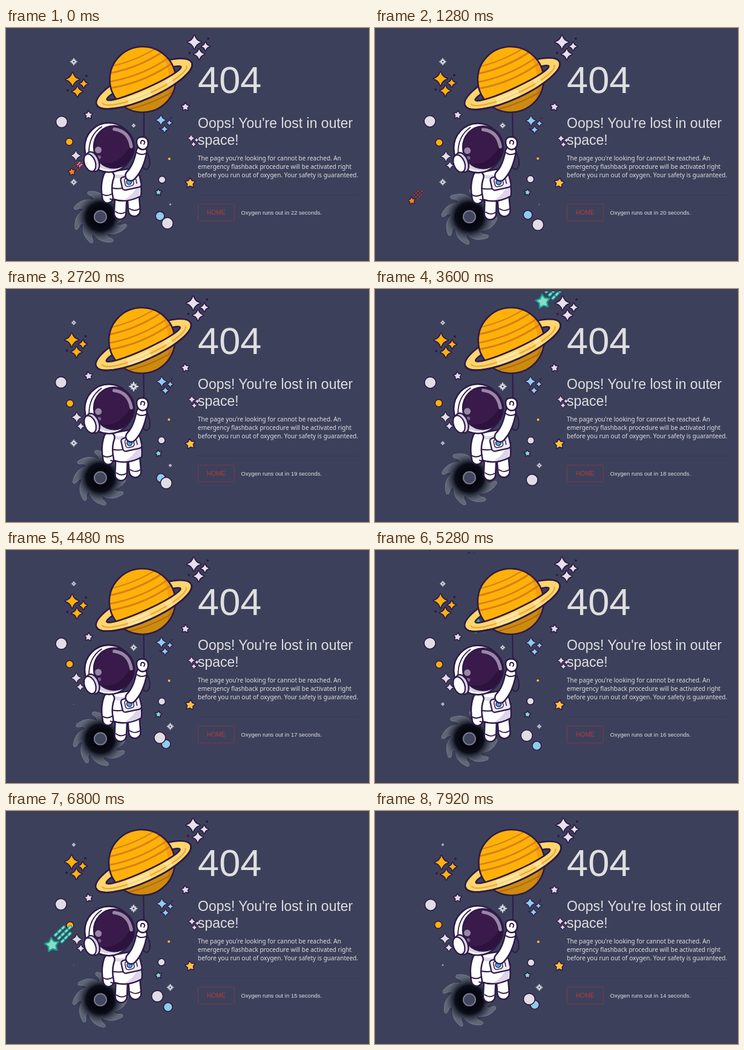
Animation, 600 px wide and 387 px high, one loop 8000 ms. Source, as an HTML page:

```html
<!DOCTYPE html>
<html lang="en">
<head>
<meta charset="utf-8">
<title>404</title>
<style>
  html, body { margin: 0; width: 100%; height: 100%; overflow: hidden; background: #3d405b; }
  svg { display: block; width: 100%; height: 100%; }
  .sans { font-family: "Liberation Sans", Arial, sans-serif; fill: #dfdfdf; }
  .note { font-family: "Noto Sans", "Open Sans", sans-serif; font-size: 10.02px; fill: #dfdfdf; }
  .ink { stroke: #2e1a47; stroke-linejoin: round; stroke-linecap: round; }
</style>
</head>
<body>
<svg viewBox="0 0 600 387" xmlns="http://www.w3.org/2000/svg">
  <defs>
    <clipPath id="art"><rect x="40" y="4" width="301" height="356"/></clipPath>
    <clipPath id="ball"><circle cx="226" cy="85.500" r="54.500"/></clipPath>
    <clipPath id="front"><rect x="-95" y="0" width="190" height="40"/></clipPath>
    <clipPath id="glass"><ellipse cx="178.500" cy="197.500" rx="33" ry="34.500"/></clipPath>
    <radialGradient id="dark">
      <stop offset="0.4" stop-color="#05060f"/>
      <stop offset="0.6" stop-color="#0a0d18"/>
      <stop offset="1" stop-color="#2b3044" stop-opacity="0"/>
    </radialGradient>
  </defs>

  <g clip-path="url(#art)">
    <g id="decor"></g>
    <g id="comets"></g>
    <g id="hole" transform="translate(156 313.500)">
      <g id="arms"></g>
      <circle r="39" fill="url(#dark)"/>
      <circle r="10" fill="#42465f" stroke="#777b8d" stroke-width="2"/>
    </g>

    <g id="planet">
      <path d="M228 138V186" class="ink" stroke-width="2"/>
      <g transform="translate(228.500 92.500) rotate(-24)">
        <path id="ring" class="ink" fill="#ffd56c" fill-rule="evenodd" stroke-width="2.6"
          d="M-86 0A86 25 0 0 1 86 0A86 25 0 0 1 -86 0ZM-67 -1A67 9 0 0 0 67 -1A67 9 0 0 0 -67 -1Z"/>
      </g>
      <circle cx="226" cy="85.500" r="54.500" fill="#ffb10a"/>
      <g clip-path="url(#ball)">
        <path d="M246 28Q284 66 262 142L290 142V28Z" fill="#f39c0c"/>
        <g id="bands" transform="translate(226 85.500) rotate(-22)" fill="none" stroke="#d87f13" stroke-linecap="round"></g>
        <rect x="-90" y="8" width="180" height="70" transform="translate(228.500 92.500) rotate(-24)" fill="#6b4214" opacity=".34"/>
      </g>
      <circle cx="226" cy="85.500" r="54.500" fill="none" class="ink" stroke-width="2.6"/>
      <g transform="translate(228.500 92.500) rotate(-24)">
        <g clip-path="url(#front)">
          <use href="#ring"/>
          <path d="M-76 1A76 17 0 0 0 76 1" fill="none" stroke="#e2aa42" stroke-width="2.2"/>
          <path d="M-36 15Q-18 18 4 17.500" fill="none" stroke="#fff0b5" stroke-width="11" opacity=".6"/>
          <path d="M34 15Q40 14 45 13" fill="none" stroke="#fff0b5" stroke-width="10" opacity=".55"/>
        </g>
        <path d="M-86 0A86 25 0 0 0 86 0" fill="none" class="ink" stroke-width="2.6"/>
      </g>
    </g>

    <g id="man">
      <path d="M228 198Q240 216 237 229Q233 239 227 232" fill="none" class="ink" stroke-width="2"/>
      <g id="legs"></g>
      <path d="M181 305Q189 311 197 306M204 300Q213 306 221 300" fill="none" class="ink" stroke-width="1.800"/>
      <path d="M166 240Q163 264 177 284Q198 292 223 279Q226 256 214 232Z" fill="#fff" class="ink" stroke-width="2.500"/>
      <path d="M176 241Q192 249 211 236L213 243Q194 254 178 248Z" fill="#ded5ea"/>
      <path d="M216 262L222 262L221 278Q208 285 194 286Q212 276 216 262Z" fill="#ded5ea"/>
      <path d="M176 266Q199 270 224 255" fill="none" class="ink" stroke-width="2"/>
      <g transform="translate(206.500 256) rotate(-12)" class="ink">
        <rect x="-16" y="-11" width="32" height="22" rx="5" fill="#eee9f5" stroke-width="2.300"/>
        <rect x="-10" y="-8" width="14" height="14" rx="4" fill="#fff" stroke-width="1.500"/>
        <circle cx="-3" cy="-1" r="4.300" fill="#4aa3e8" stroke-width="1.400"/>
        <path d="M9 -3V4" stroke-width="1.500"/>
      </g>
      <g id="upperArms"></g>
      <path d="M215 206Q223 213 232 208" fill="none" class="ink" stroke-width="2"/>
      <path d="M216 191Q215 181 225 181Q235 181 235 191Q235 202 225 202Q217 200 216 191Z" fill="#fff" class="ink" stroke-width="2.400"/>
      <path d="M223 192Q222 186 227 187Q231 189 228 193" class="ink" fill="none" stroke-width="2"/>
      <path d="M159 276Q167 281 176 275M172 284L179 286" fill="none" class="ink" stroke-width="2"/>
      <ellipse cx="170" cy="198.500" rx="40" ry="41" fill="#fff" class="ink" stroke-width="2.600"/>
      <path d="M146 225Q162 241 188 234Q166 231 153 217Z" fill="#d9cfe6"/>
      <ellipse cx="178.500" cy="197.500" rx="33.500" ry="35" fill="#3a1a4b" class="ink" stroke-width="2.500"/>
      <g clip-path="url(#glass)">
        <path d="M152 222Q184 234 207 194L218 214L190 239Z" fill="#2d123d"/>
        <path d="M179 168Q203 171 207 197" fill="none" stroke="#9688a6" stroke-width="5.500" stroke-linecap="round"/>
        <circle cx="152.500" cy="202.500" r="5.500" fill="#9688a6"/>
        <circle cx="154" cy="214.500" r="3" fill="#75638a"/>
      </g>
      <path d="M137 207Q137 178 158 164" fill="none" class="ink" stroke-width="1.800"/>
      <g transform="translate(140.500 223) rotate(-20)">
        <ellipse cx="3" rx="10" ry="17" fill="#d9cfe6" class="ink" stroke-width="2.400"/>
        <ellipse cx="-2" rx="9" ry="15" fill="#fff" class="ink" stroke-width="2.200"/>
      </g>
    </g>
  </g>

  <text class="sans" x="317" y="107.500" font-size="63.200">404</text>
  <text class="sans" font-size="23"><tspan x="317" y="166">Oops! You're lost in outer</tspan><tspan x="317" y="194">space!</tspan></text>
  <text class="note">
    <tspan x="317" y="220">The page you're looking for cannot be reached. An</tspan>
    <tspan x="317" y="234">emergency flashback procedure will be activated right</tspan>
    <tspan x="317" y="248">before you run out of oxygen. Your safety is guaranteed.</tspan>
  </text>
  <path d="M317 277.500H583" stroke="#383a54"/>
  <rect x="317.500" y="292.500" width="60" height="28" rx="2" fill="none" stroke="#763b48"/>
  <text class="sans" x="332" y="310" font-size="10.200" style="fill:#b23c36">HOME</text>
  <text class="sans" id="count" x="388.500" y="309.500" font-size="9.500"></text>
</svg>
<script>
const LOOP = 8000, TAU = Math.PI * 2;
const $ = id => document.getElementById(id);
const INK = '#2e1a47';

function add(parent, tag, attrs) {
  const el = document.createElementNS('http://www.w3.org/2000/svg', tag);
  for (const k in attrs) el.setAttribute(k, attrs[k]);
  parent.append(el);
  return el;
}
const place = (el, x, y, rot = 0, size = 1) =>
  el.setAttribute('transform', `translate(${x} ${y}) rotate(${rot}) scale(${size})`);

function spark(r) {
  const c = r * 0.22;
  return `M0 ${-r}Q${c} ${-c} ${r} 0Q${c} ${c} 0 ${r}Q${-c} ${c} ${-r} 0Q${-c} ${-c} 0 ${-r}Z`;
}
function fivePoint(r) {
  let d = '';
  for (let i = 0; i < 10; i++) {
    const a = i * TAU / 10, q = i % 2 ? r * 0.55 : r;
    d += (i ? 'L' : 'M') + (q * Math.sin(a)).toFixed(2) + ' ' + (-q * Math.cos(a)).toFixed(2);
  }
  return d + 'Z';
}
function limb(parent, d, w) {
  for (const [color, width] of [[INK, w + 5], ['#fff', w]])
    add(parent, 'path', { d, fill: 'none', stroke: color, 'stroke-width': width, 'stroke-linecap': 'round' });
}

limb($('legs'), 'M190 278L188.500 308', 17);
limb($('legs'), 'M210 276L212 303', 17);
limb($('upperArms'), 'M170 246Q164 262 168 282', 15);
limb($('upperArms'), 'M206 245Q219 232 224 205', 15);

for (const [y, w] of [[-44, 2], [-33, 3], [-19, 2.5], [-8, 3], [22, 2.5], [33, 2]])
  add($('bands'), 'path', { d: `M-60 ${y}Q0 ${y + 15} 60 ${y}`, 'stroke-width': w });

for (let i = 0; i < 8; i++)
  add($('arms'), 'path', {
    d: 'M15 -20Q6 -44 -19 -42Q-24 -39 -18 -36Q-7 -33 -12 -20Z',
    fill: '#5f6676', stroke: '#747a88', 'stroke-width': 1, transform: `rotate(${i * 45})`
  });

// Drifting items: x, y, shift x, shift y at the far end of the sway
const drifters = [];
function drifter(x, y, dx, dy) {
  const el = add($('decor'), 'g', {});
  drifters.push({ el, x, y, dx, dy });
  return el;
}
function cluster(x, y, dx, dy, fill, line, parts, dots = []) {
  const g = drifter(x, y, dx, dy);
  for (const [px, py, r] of parts)
    add(g, 'path', { d: spark(r), fill, stroke: INK, 'stroke-width': line, 'stroke-linejoin': 'round', 'paint-order': 'stroke', transform: `translate(${px} ${py})` });
  for (const [px, py, r] of dots) add(g, 'circle', { cx: px, cy: py, r, fill: INK });
}
const trio = [[0, 0, 11], [18.5, 7, 6.5], [8, 20, 8.5]], trioDots = [[-8, 18, 2], [23, -6, 2]];
cluster(110, 85.5, -2, -1.3, '#ffb10a', 3.6, trio, trioDots);
cluster(311.3, 23.5, -2.7, 0, '#e6e1ea', 3.6, trio, trioDots);
cluster(256, 153, 2, 1.2, '#8ecdf0', 2.6, [[0, 0, 8], [14, 4.5, 4.5], [6, 15, 5.5]], [[17, -4, 1.3], [-2, 14, 1.3]]);
cluster(115.5, 212, 2, 1.4, '#e2dce8', 2.6, [[0, 0, 8], [6.5, 15, 6]]);
cluster(306, 183, 1.6, 0.6, '#e6d5df', 2.2, [[0, 0, 5.5], [9, 3, 3.5], [4, 10, 4]]);

function ball(x, y, r, fill, dx, dy) {
  add(drifter(x, y, dx, dy), 'circle', { r, fill, stroke: INK, 'stroke-width': Math.min(1.6, r / 4) });
}
ball(92, 156, 9.5, '#e0dde5', -1.5, -1.2);
ball(104.5, 189, 6, '#ffb10a', 1.7, 1.3);
ball(258, 252, 5.8, '#e0dde5', -1.2, -1);
ball(270, 217.3, 2.4, '#ffc13d', -1, -0.5);

const rockers = [[136.5, 144.5, 7.5, '#e0dbe6'], [296.5, 131, 7.5, '#e0dbe6'], [304.5, 257.5, 9, '#ffc23e'], [252, 273, 6, '#83dcc3']]
  .map(([x, y, r, fill]) => ({
    x, y, el: add($('decor'), 'path', { d: fivePoint(r), fill, stroke: INK, 'stroke-width': 1.5, 'stroke-linejoin': 'round' })
  }));

const blueMoon = add($('decor'), 'circle', { r: 7.4, fill: '#8ecbea', stroke: INK, 'stroke-width': 1.6 });
const paleMoon = add($('decor'), 'circle', { r: 9.5, fill: '#e0dde5', stroke: INK, 'stroke-width': 1.6 });

// Twinkles: radius at each of the key times
const keys = [0, 1280, 2720, 4480, 6000, 6800, 7920];
const twinkles = [
  [112, 56, [6, 6, 4, 4, 5.5, 3.2, 2.3]],
  [112, 256, [5.5, 5.5, 6, 0.6, 5, 0.6, 1.6]],
  [211, 162, [3.4, 4.8, 8, 5.5, 3, 6.5, 7.2]],
  [271.5, 293, [1.8, 0.8, 2.8, 5.8, 2.1, 5.8, 5.8]]
].map(([x, y, size]) => {
  const el = add($('decor'), 'g', {});
  add(el, 'path', { d: spark(1), fill: '#d9d8df', stroke: '#d9d8df', 'stroke-width': 0.12 });
  add(el, 'path', { d: 'M.4 -.4L.55 -.55M.4 .4L.55 .55M-.4 .4L-.55 .55M-.4 -.4L-.55 -.55', stroke: '#d9d8df', 'stroke-width': 0.16, 'stroke-linecap': 'round' });
  add(el, 'circle', { r: 0.22, fill: '#3d405b' });
  return { el, x, y, size };
});
function keyed(size, t) {
  let i = 0;
  while (i < keys.length - 2 && t >= keys[i + 1]) i++;
  const p = Math.min(1, (t - keys[i]) / (keys[i + 1] - keys[i]));
  return size[i] + (size[i + 1] - size[i]) * (1 - Math.cos(p * Math.PI)) / 2;
}

// Comets: position at a moment, and speed down-left in px per second
const comets = [
  { at: 0, x: 109, y: 239, v: 37.5, size: 0.75, fill: '#f5860f', line: INK, tail: '#d9573a', edge: INK },
  { at: 6000, x: 126.5, y: 172, v: 63, size: 1.35, fill: '#86dcc5', line: '#189b90', tail: '#8ce0cc', edge: '#189b90' },
  { at: 6000, x: 91, y: 65, v: 94, size: 1, fill: '#f5860f', line: INK, tail: '#d9573a', edge: INK }
];
for (const c of comets) {
  c.el = add($('comets'), 'g', {});
  const d = 'M4 -12L16 -23.500M8 -8L23 -22.500M12 -4L23 -15';
  for (const [stroke, width] of [[c.edge, 4], [c.tail, 2]])
    add(c.el, 'path', { d, stroke, fill: 'none', 'stroke-width': width, 'stroke-dasharray': '2.6 3.4', 'stroke-linecap': 'round' });
  add(c.el, 'path', { d: fivePoint(9), fill: c.fill, stroke: c.line, 'stroke-width': 1.7, 'stroke-linejoin': 'round', transform: 'rotate(-8)' });
}

function draw(t) {
  const sway = (1 - Math.cos(TAU * (t - 70) / 2000)) / 2;
  const tilt = `rotate(${-1.05 * sway} 226 190)`;
  $('planet').setAttribute('transform', tilt);
  $('man').setAttribute('transform', tilt);
  for (const d of drifters) place(d.el, d.x + d.dx * sway, d.y + d.dy * sway);

  const rock = 10 * Math.sin(TAU * t / 4000);
  for (const r of rockers) place(r.el, r.x, r.y, rock);

  const swing = Math.cos(TAU * (t - 1150) / 10000);
  place(paleMoon, 259.3 + 10 * swing, 316.8 + 10 * swing);
  place(blueMoon, 260.5 - 8 * swing, 318.3 - 8 * swing);

  for (const w of twinkles) place(w.el, w.x, w.y, 0, keyed(w.size, t));
  for (const c of comets) {
    const d = c.v * (t - c.at) / 1000;
    place(c.el, c.x - d, c.y + d, 0, c.size);
  }
  $('arms').setAttribute('transform', `rotate(${t * 0.0225})`);

  const left = 22 - Math.floor((t + 760) / 1000);
  $('count').textContent = `Oxygen runs out in ${left} seconds.`;
}

const start = performance.now();
function tick() {
  draw((performance.now() - start) % LOOP);
  requestAnimationFrame(tick);
}
tick();
</script>
</body>
</html>
```
